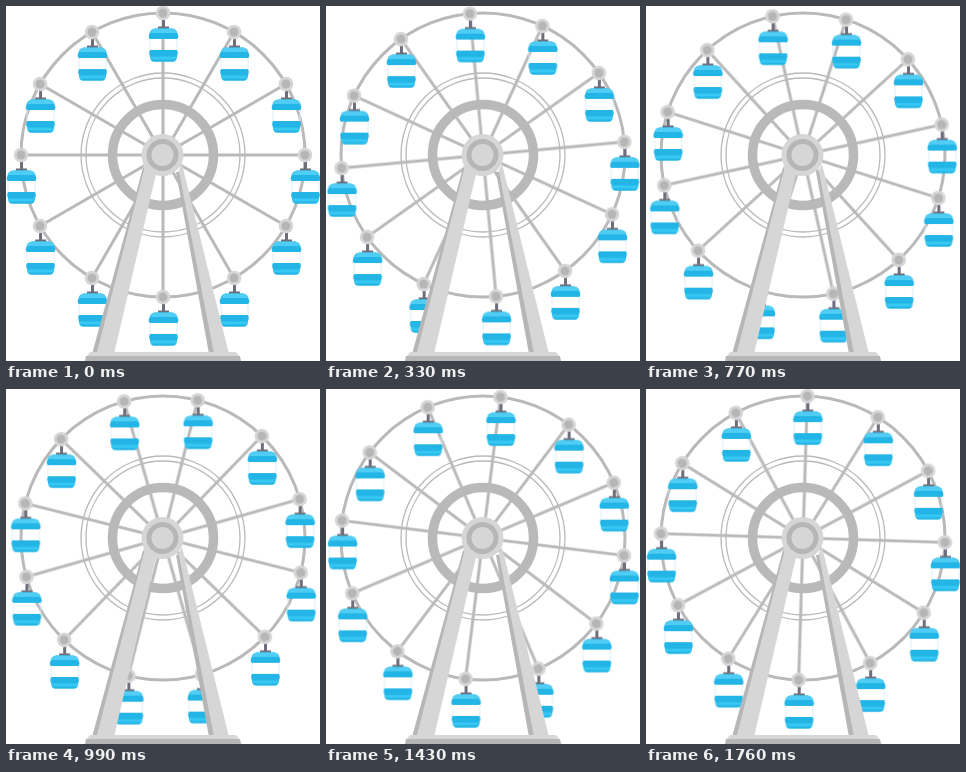
Recreate the animation shown at these times as an HTML page. Size 314 by 355 pixels, loop 1870 ms.

```html
<!DOCTYPE html>
<html lang="en">
<head>
<meta charset="utf-8">
<title>Ferris wheel</title>
<style>
  html, body { margin: 0; width: 100%; height: 100%; overflow: hidden; background: #fff; }
  svg { display: block; width: 314px; height: 355px; }
  .light { fill: #d6d6d6; }
  .dark { fill: #b6b6b7; }
  .line { fill: none; stroke: #b9b9ba; }
  /* One loop moves each gondola to its neighbour's place. */
  .wheel, .cabin { animation: turn 1870ms steps(17) infinite; }
  .wheel { --turn: -30deg; }
  .cabin { --turn: 30deg; }
  @keyframes turn { to { transform: rotate(var(--turn)); } }
</style>
</head>
<body>
<svg viewBox="0 0 314 355">
  <defs>
    <g id="gondola">
      <path d="M-1 5h3v8.500h4V16H-5v-2.500h4z" fill="#6d6e7c"/>
      <path d="M-8 15.500H9q4 .5 5 3.500l1.300 4q0 3-1.500 3H-12.800q-1.500 0-1.500-3l1.300-4q1-3 5-3.500z" fill="#23b5e5"/>
      <path d="M-8 15.500H9q4 .5 5 3.500l.3 1H-13.300l.3-1q1-3 5-3.500z" fill="#4fcdf4"/>
      <path d="M-13 26v11M14 26v11" fill="none" stroke="#dceff6"/>
      <path d="M-12.500 37H13.500q1.300 0 1.300 3.500l-1.300 5q-.7 3.200-3.500 3.200H-9q-2.800 0-3.500-3.200l-1.300-5q0-3.500 1.300-3.500z" fill="#23b5e5"/>
      <path d="M-13 43.500h27l-.7 3h-25.600z" fill="#38c8f4"/>
    </g>
  </defs>

  <g transform="translate(157 149)">
    <g class="line">
      <circle r="142" stroke-width="3"/>
      <circle r="82" stroke-width="1.300"/>
      <circle r="77" stroke-width="1.300"/>
      <circle r="50.500" stroke-width="9.500"/>
    </g>
    <g class="wheel" id="wheel"></g>
  </g>

  <path class="light" d="M138 158 89 348h19l42-180zM171 168l34 180h18L176 158z"/>
  <path class="dark" d="M137 162 86 348h4.500L138.500 162zM170 166l33 182h5L173 166z"/>
  <path class="light" d="M84 346H230l4 5H80z"/>
  <path class="dark" d="M80 350H234l1 5H79z"/>
  <g transform="translate(156.500 149)">
    <circle class="light" r="21"/>
    <circle class="dark" r="16"/>
    <circle class="light" r="11"/>
  </g>
</svg>
<script>
  const seats = 12, radius = 142;
  const angles = Array.from({ length: seats }, (_, i) => i * 360 / seats);
  const spoke = a =>
    `<path class="line" stroke-width="3" d="M0 0V${-radius}" transform="rotate(${a})"/>`;
  const seat = a =>
    `<g transform="rotate(${a}) translate(0 ${-radius}) rotate(${-a})">
      <g class="cabin"><use href="#gondola"/></g>
      <circle class="light" r="7.300"/><circle class="dark" r="4.500"/>
    </g>`;
  document.getElementById('wheel').innerHTML =
    angles.map(spoke).join('') + angles.map(seat).join('');
</script>
</body>
</html>
```
